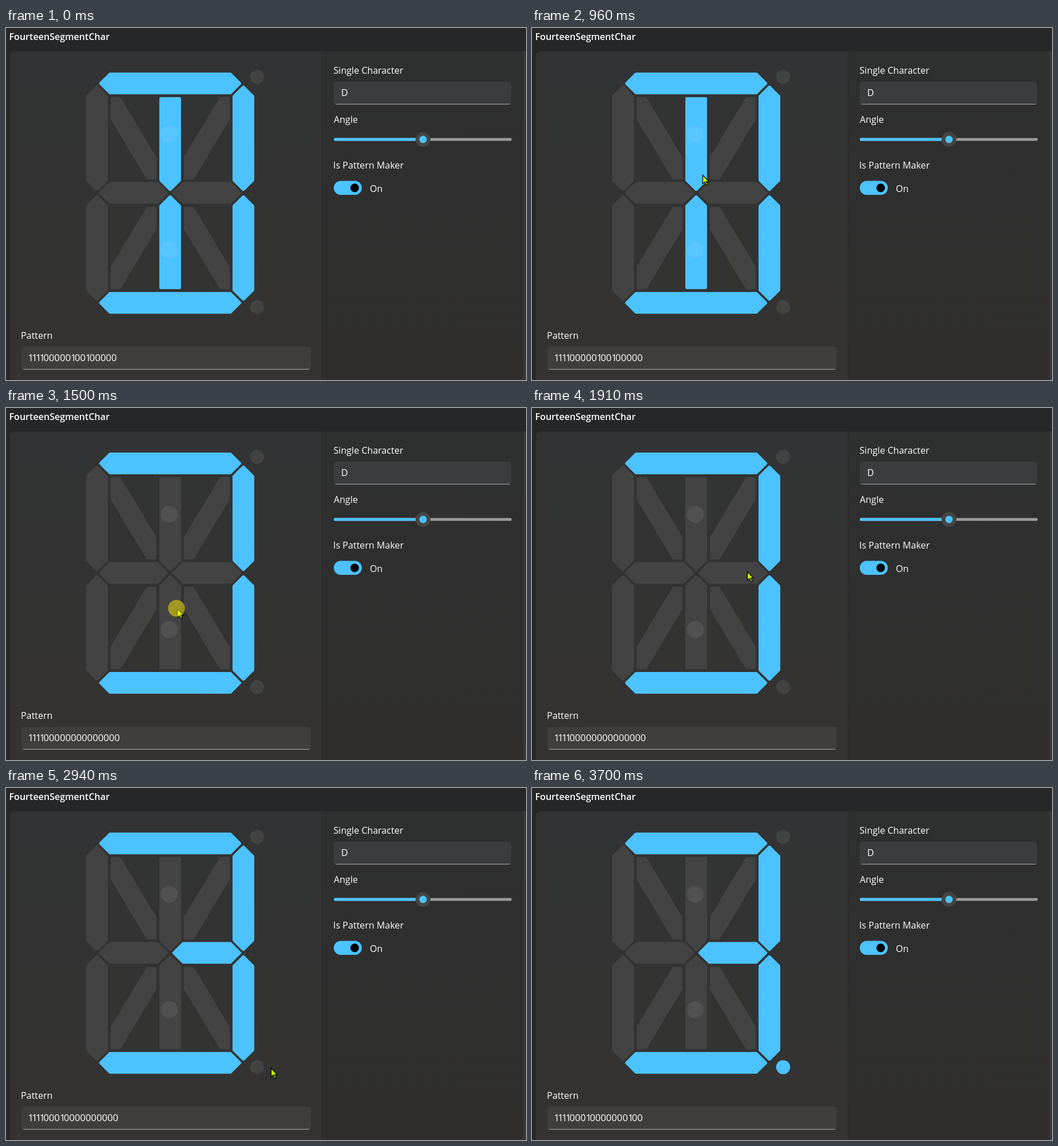
Recreate the animation shown at these times as an HTML page with a canvas. Size 909 by 616 pixels, loop 4170 ms.

```html
<!DOCTYPE html>
<html lang="en">
<head>
<meta charset="utf-8">
<title>FourteenSegmentChar</title>
<style>
  html, body { margin: 0; width: 100%; height: 100%; overflow: hidden; background: #262729; }
  canvas { display: block; }
</style>
</head>
<body>
<canvas id="stage" width="909" height="616"></canvas>
<script>
const ctx = document.getElementById('stage').getContext('2d');
const LOOP = 4170, TICK = 68.5, TICK_OFFSET = 18;
const ACCENT = '#4cc2ff', OFF = '#434343', LINE = '#9b9b9b';

// The character sits on a grid of 3 x 3 nodes around its center
const CENTER = { x: 287, y: 289 }, CELL = { w: 128, h: 192 };
const HALF = 19, GAP = 2.7, INSET = HALF + 5;

const place = points => points.map(([x, y]) => [CENTER.x + x, CENTER.y + y]);
const flip = (points, sx, sy) => points.map(([x, y]) => [x * sx, y * sy]);
const swap = points => points.map(([x, y]) => [y, x]);

// Pointed bar along x from one node to another
function bar(from, to, y) {
  const a = from + GAP, b = to - GAP;
  return [[a, y], [a + HALF, y - HALF], [b - HALF, y - HALF],
    [b, y], [b - HALF, y + HALF], [a + HALF, y + HALF]];
}
const post = (side, half) => swap(bar(half < 0 ? -CELL.h : 0, half < 0 ? 0 : CELL.h, side * CELL.w));

// Inner parts, drawn for the lower right cell and mirrored into the others
const right = CELL.w - INSET, bottom = CELL.h - INSET, cutX = HALF - 2, cutY = 2 * HALF + 1;
const diagonal = [[INSET, INSET], [INSET + cutX, INSET], [right, bottom - cutY],
  [right, bottom], [right - cutX, bottom], [INSET, INSET + cutY]];
const stem = [[0, GAP], [HALF, GAP + HALF], [HALF, bottom], [-HALF, bottom], [-HALF, GAP + HALF]];

// Listed in the order of the digits in the pattern
const segments = [
  bar(-CELL.w, CELL.w, -CELL.h), post(1, -1), post(1, 1), bar(-CELL.w, CELL.w, CELL.h),
  post(-1, 1), post(-1, -1), bar(-CELL.w, 0, -.5), bar(0, CELL.w, -.5),
  flip(diagonal, -1, -1), flip(stem, 1, -1), flip(diagonal, 1, -1),
  diagonal, stem, flip(diagonal, -1, 1)
].map(place);
const dotX = CENTER.x + CELL.w + INSET, dotY = [85.5, 488.5];

// Pointer moves; `power` is the ease-out exponent, `click` the tick that toggles a digit
const entry = { tick: 5, x: 647, y: 567 };
const moves = [
  { start: 5, end: 14, x: 298, y: 257, power: 2, click: 16, digit: 9 },
  { start: 16, end: 20.6, x: 299, y: 351, power: 2, click: 22, digit: 12 },
  { start: 23, end: 28, x: 376, y: 286, power: 2, click: 32, digit: 7 },
  { start: 33.8, end: 43, x: 463, y: 490, power: 1 },
  { start: 44, end: 47, x: 446, y: 491, power: 1, click: 49, digit: 15 },
  { start: 50, end: 53, x: 474, y: 588, power: 1 }
];

function pointerAt(tick) {
  if (tick < entry.tick || tick > moves[moves.length - 1].end) return null;
  let { x, y } = entry;
  for (const move of moves) {
    const u = Math.min(1, Math.max(0, (tick - move.start) / (move.end - move.start)));
    const k = 1 - (1 - u) ** move.power;
    x += (move.x - x) * k;
    y += (move.y - y) * k;
  }
  return [Math.round(x), Math.round(y)];
}

function patternAt(tick) {
  const digits = [...'111100000100100000'];
  for (const { click, digit } of moves) {
    if (tick >= click) digits[digit] = digits[digit] === '1' ? '0' : '1';
  }
  return digits;
}

function circle(x, y, r, color) {
  ctx.fillStyle = color;
  ctx.beginPath();
  ctx.arc(x, y, r, 0, Math.PI * 2);
  ctx.fill();
}

function box(x, y, w, h, r, color) {
  ctx.fillStyle = color;
  ctx.beginPath();
  ctx.roundRect(x, y, w, h, r);
  ctx.fill();
}

function text(string, x, y, weight = 400, size = 16.1) {
  ctx.font = `${weight} ${size}px "Open Sans", "Noto Sans", sans-serif`;
  ctx.fillStyle = '#fff';
  ctx.fillText(string, x, y);
}

function roundedPolygon(points, color) {
  const first = points[0], last = points[points.length - 1];
  ctx.fillStyle = color;
  ctx.beginPath();
  ctx.moveTo((last[0] + first[0]) / 2, (last[1] + first[1]) / 2);
  points.forEach((p, i) => ctx.arcTo(...p, ...points[(i + 1) % points.length], 3));
  ctx.closePath();
  ctx.fill();
}

function field(x, y, w, color) {
  ctx.save();
  ctx.beginPath();
  ctx.roundRect(x, y, w, 40, 5);
  ctx.clip();
  box(x, y, w, 40, 0, color);
  box(x, y + 38.8, w, 1.2, 0, LINE);
  ctx.restore();
}

function shade(top, bottom) {
  const gradient = ctx.createLinearGradient(0, 41, 0, 616);
  gradient.addColorStop(0, top);
  gradient.addColorStop(1, bottom);
  return gradient;
}

function drawPanels() {
  box(0, 0, 909, 616, 0, '#262729');
  box(7, 41, 545, 575, [8, 0, 0, 0], shade('#323334', '#343331'));
  box(552, 41, 352, 575, 0, shade('#2e2f2f', '#2f2e2d'));
  box(552, 41, 1, 575, 0, '#292929');
  box(904, 41, 5, 575, 0, '#383838');
  text('FourteenSegmentChar', 5.5, 21, 600);
  text('Pattern', 26, 543.5);
  field(27, 558, 506, '#3f3e3d');
}

function drawSettings() {
  text('Single Character', 572.5, 80);
  field(573, 94, 310.5, '#3b3c3d');
  text('D', 586, 119);
  text('Angle', 573, 166);
  box(573, 192.5, 311, 5, 2.5, LINE);
  box(573, 192.5, 156, 5, 2.5, ACCENT);
  circle(729, 195, 13, '#454545');
  circle(729, 195, 6.5, ACCENT);
  text('Is Pattern Maker', 572, 246);
  box(573, 267.5, 49, 24.5, 12.25, ACCENT);
  circle(609.5, 279.8, 7.5, '#000');
  text('On', 636, 287);
}

function drawCharacter(digits) {
  const color = i => digits[i] === '1' ? ACCENT : OFF;
  segments.forEach((shape, i) => roundedPolygon(shape, color(i)));
  dotY.forEach((y, i) => circle(dotX, y, 12.3, color(segments.length + i)));
  for (const y of [186, 388]) circle(285.5, y, 15, 'rgba(255,255,255,.08)');
}

// Proportional digits: a one is narrower than a zero
function drawPattern(digits) {
  const size = 16.7;
  let x = 38.5;
  for (const digit of digits) {
    text(digit, x, 583, 400, size);
    x += ctx.measureText(digit).width - (digit === '1' ? size / 6 : 0);
  }
}

function drawPointer(tick) {
  const pointer = pointerAt(tick);
  if (!pointer) return;
  const [x, y] = pointer;
  const arrow = new Path2D('M.5 .5V15.5L4 12.3L6.5 18L9 17L6.5 11.5H11Z');
  ctx.save();
  ctx.translate(x, y);
  ctx.fillStyle = '#c8ff00';
  ctx.fill(arrow);
  ctx.strokeStyle = '#000';
  ctx.lineWidth = 1.2;
  ctx.stroke(arrow);
  ctx.restore();
  if (moves.some(move => move.click === tick)) circle(x - 1, y - .5, 14.7, 'rgba(255,240,0,.5)');
}

function frame() {
  const tick = Math.floor((performance.now() % LOOP + TICK_OFFSET) / TICK);
  const digits = patternAt(tick);
  drawPanels();
  drawSettings();
  drawCharacter(digits);
  drawPattern(digits);
  drawPointer(tick);
  requestAnimationFrame(frame);
}
frame();
</script>
</body>
</html>
```
